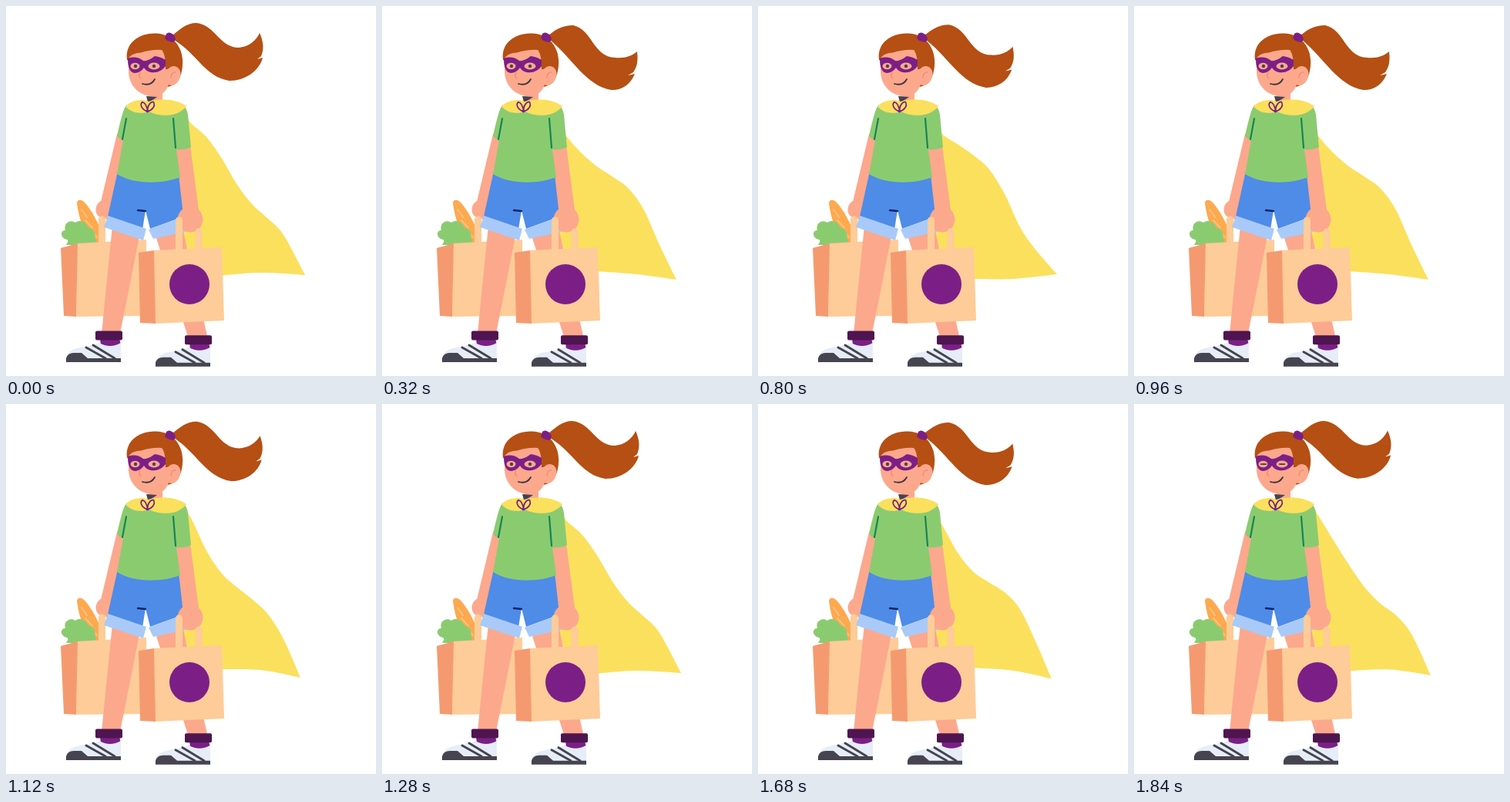
These frames come from a looping animation (480 by 480 pixels, 1920 ms). An HTML page:

```html
<!DOCTYPE html>
<html lang="en">
<head>
<meta charset="utf-8">
<title>Caped shopper</title>
<style>
html, body { margin: 0; width: 100%; height: 100%; overflow: hidden; background: #fff; }
svg { display: block; width: 100vw; height: 100vh; }
.skin { fill: #fca88d; }
.yellow { fill: #fbe05d; }
.green { fill: #8bcb70; }
.blue { fill: #4e8ce8; }
.cuff { fill: #a9caf8; }
.bag { fill: #fecc98; }
.side { fill: #f59a70; }
.hair { fill: #b54f13; }
.purple { fill: #7b1f86; }
.dark { fill: #45444f; }
.line { fill: none; stroke-linecap: round; stroke-linejoin: round; }
</style>
</head>
<body>
<svg viewBox="0 0 480 480">
  <path id="cape" class="yellow"/>
  <path id="tail" class="hair"/>

  <!-- rear bag and groceries -->
  <path d="M92 256C92 251 98 250 103 256C115 270 124 290 129 309H113C102 297 95 278 92 256Z" fill="#fda94f"/>
  <path class="line" d="M98 264L105 274M103 278L112 288M110 291L118 300" stroke="#fbc07a" stroke-width="2"/>
  <path class="green" d="M78 310Q82 304 79 303C70 301 70 291 77 291C74 282 83 276 90 281C97 276 106 282 106 287C114 288 117 296 115 300Q118 305 117 310Z"/>
  <path class="bag" d="M92 308L182 303V402L91 403Z"/>
  <path class="side" d="M71 314L93 308L91 403L75 402Z"/>

  <!-- far arm -->
  <path class="skin" d="M144 166L153 173L136 264L122 258Z"/>
  <circle class="skin" cx="129" cy="264" r="12.500"/>
  <path class="line" d="M124.500 277V309" stroke="#fecc98" stroke-width="9"/>

  <!-- legs -->
  <path class="skin" d="M138 285L173 299L148 425H124Z"/>
  <path class="skin" d="M194 298L229 288L262 432H237Z"/>
  <g id="foot">
    <path class="purple" d="M122 431H147L149 440Q137 448 123 440Z"/>
    <rect x="116" y="421.500" width="35" height="12" rx="2" fill="#4f1550"/>
    <path d="M78 458C79 447 90 443 104 442L121 437Q135 445 149 437V459Z" fill="#e6edf8"/>
    <path class="line" d="M104 443L129 457M113 440L141 457" stroke="#45444f" stroke-width="3"/>
    <path class="dark" d="M78 462V457Q80 450 88 450H98L106 457H149V462Z"/>
  </g>
  <use href="#foot" x="116" y="5.700"/>

  <!-- shorts -->
  <path class="blue" d="M145 214L226 218L231 273L187 289L181 265L177 290L132 273Z"/>
  <path class="cuff" d="M132 272L182 289L178 304L127 287Z"/>
  <path class="cuff" d="M185 290L231 273L233 293L191 302Z"/>
  <path class="line" d="M171 265L181 266" stroke="#172468" stroke-width="2.400"/>

  <!-- near arm -->
  <path class="skin" d="M220 183L239 181L251 272H230Z"/>

  <!-- shirt -->
  <path class="green" d="M156 129C151 136 149 148 144 168Q147 173 152 174L144 218C166 232 204 231 226 222L221 186Q232 187 240 183L236 141Q235 133 229 128Z"/>
  <path class="line" d="M156 146L151 173M217 146L220 184" stroke="#168554" stroke-width="2.200"/>

  <!-- neck and collar -->
  <path class="skin" d="M184 110H203V126L186 128Z"/>
  <path class="dark" d="M182 117L196 118Q189 123 184 125Z"/>
  <path class="yellow" d="M155 130C163 122 177 120 185 124C200 119 223 121 234 130C222 146 197 143 186 137C174 141 161 138 155 130Z"/>
  <path class="line" d="M183.500 137C176 134 173 128 177 124.500Q183 127 183.500 137C183 130 187 124 191.500 124.500C194 130 190 135 183.500 137" stroke="#7b1f86" stroke-width="1.700"/>
  <circle class="purple" cx="183.500" cy="136.500" r="1.800"/>

  <!-- head -->
  <path class="hair" d="M157 70C154 46 175 35 194 35.500C220 36 231 58 229 77C228 96 218 104 209 105L190 80Z"/>
  <path class="skin" d="M158 69Q162 61 175 60.500Q190 56 202 57Q207 62 207 82H210C217 73 229 80 226 91C224 101 216 105 211 102C207 113 200 117 189 117C171 116 158 101 159 82Z"/>
  <path class="line" d="M214 93Q215 85 220 86M174 86Q171 91 175 94" stroke="#ed8b72" stroke-width="1.300"/>
  <path class="purple" d="M158 68Q169 64 178 71Q184 72 193 65Q201 66 207 70L207 78Q199 88 188 86Q182 85 179 80Q174 87 167 87Q158 86 158 68Z"/>
  <g class="skin">
    <ellipse cx="167.500" cy="78" rx="6" ry="4.200"/>
    <ellipse cx="192" cy="78" rx="7.500" ry="4.400"/>
  </g>
  <g class="dark">
    <ellipse class="pupil" cx="168" cy="78"/>
    <ellipse class="pupil" cx="192" cy="78"/>
  </g>
  <path class="line" d="M177 101Q188 104 193 95" stroke="#3b3340" stroke-width="1.800"/>
  <path class="purple" d="M208 36Q212 32 218 38Q222 44 217 47Q209 46 206 42Z"/>

  <!-- front bag -->
  <circle class="skin" cx="239" cy="277" r="16.500"/>
  <path class="line" d="M224.500 278V320M250 293V318" stroke="#fecc98" stroke-width="9"/>
  <path class="bag" d="M191 317L280 313L283 408L193 412Z"/>
  <path class="side" d="M172 320L192 317L194 412L174 411Z"/>
  <circle class="purple" cx="238" cy="361" r="26"/>
</svg>
<script>
const LOOP = 1920, SWAY = 640, STEP = 80;
const cape = document.getElementById('cape');
const tail = document.getElementById('tail');
const pupils = document.querySelectorAll('.pupil');

// Cape at four quarters of the sway: edge heights, tip x and y, hem heights
const edgeX = [240, 260, 280, 300, 320, 340, 360];
const capePoses = [
  [152, 170, 198, 232, 258, 276, 297, 388, 349, 346, 350],
  [167, 180, 194, 212, 244, 287, 316, 388, 348, 354, 354],
  [170, 192, 209, 222, 237, 265, 310, 382, 355, 348, 344],
  [148, 190, 220, 238, 254, 273, 305, 382, 355, 345, 344]
];
const tailUp = 'M216 38C226 30 234 22 247 22C272 25 277 54 302 54C314 53 324 46 329 35C334 46 335 56 331 65L326 69L333 67C329 84 310 97 290 97C258 92 249 63 218 44Z';
const tailDown = 'M216 38C226 30 235 25 248 25C274 31 273 66 303 67C315 68 324 65 331 59C332 70 332 77 326 86L319 90L328 88C322 102 312 109 298 109C265 104 247 68 218 44Z';

function blend(a, b, k) {
  const ends = b.match(/\d+/g);
  let i = 0;
  return a.replace(/\d+/g, v => (+v + (ends[i++] - v) * k).toFixed(2));
}

// Smooth curve through points, continuing from the first one
function spline(pts) {
  let d = '';
  for (let i = 0; i < pts.length - 1; i++) {
    const p = pts[i], q = pts[i + 1];
    const before = pts[i - 1] || p, after = pts[i + 2] || q;
    const c1 = p.map((v, n) => v + (q[n] - before[n]) / 6);
    const c2 = q.map((v, n) => v - (after[n] - p[n]) / 6);
    d += `C${c1} ${c2} ${q}`;
  }
  return d;
}

function capePath(angle) {
  const weights = capePoses.map((_, j) => {
    const a = angle - j * Math.PI / 2;
    return (1 + 2 * Math.cos(a) + Math.cos(2 * a)) / 4;
  });
  const v = capePoses[0].map((_, i) =>
    capePoses.reduce((sum, pose, j) => sum + pose[i] * weights[j], 0));
  const [tipX, tipY, hemMid, hemIn] = v.slice(7);
  const start = [228, v[0] - 18];
  const edge = [start, ...edgeX.map((x, i) => [x, v[i]]), [tipX, tipY]];
  return `M${start}${spline(edge)}${spline([[tipX, tipY], [330, hemMid], [275, hemIn]])}L236 316L226 285Z`;
}

function draw(now) {
  const t = Math.floor(now % LOOP / STEP) * STEP;
  const angle = t / SWAY * 2 * Math.PI;
  cape.setAttribute('d', capePath(angle));
  tail.setAttribute('d', blend(tailUp, tailDown, 0.5 - 0.5 * Math.cos(angle) + 0.24 * Math.sin(angle)));

  const shut = t >= 1840 ? 1 : t >= 1760 ? 0.5 : 0;
  for (const p of pupils) {
    p.setAttribute('rx', 2.2 + 2.3 * shut);
    p.setAttribute('ry', 2.2 - 1.2 * shut);
  }
}

const begin = performance.now();
function tick() {
  draw(performance.now() - begin);
  requestAnimationFrame(tick);
}
tick();
</script>
</body>
</html>
```
